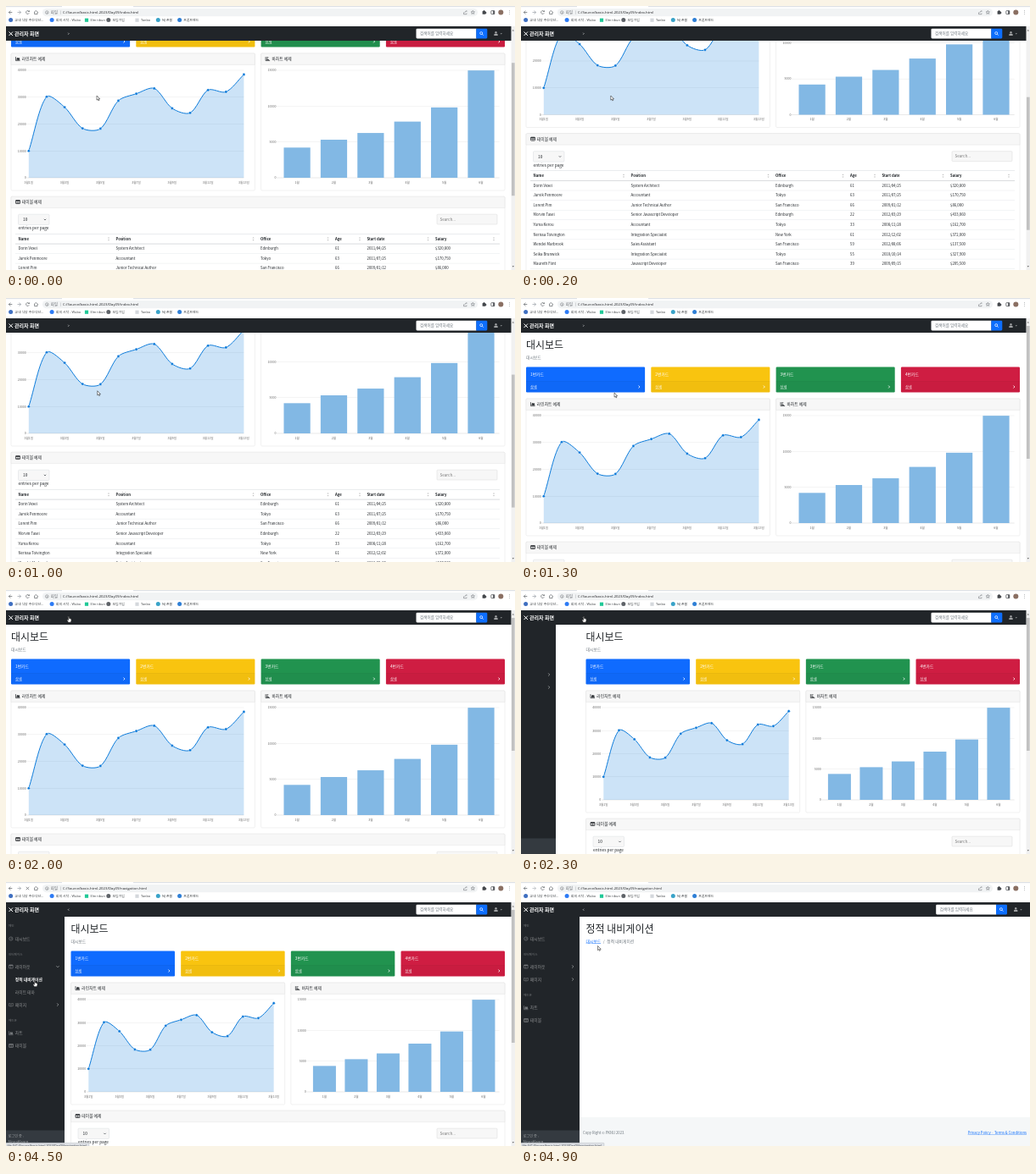
These frames come from a looping animation (600 by 312 pixels, 5 s). An HTML page with a canvas:

```html
<!DOCTYPE html>
<html lang="ko">
<head>
<meta charset="utf-8">
<title>관리자 화면</title>
<style>
html, body { margin: 0; width: 100%; height: 100%; overflow: hidden; background: #fff; }
canvas { display: block; width: 600px; height: 312px; }
</style>
</head>
<body>
<canvas id="stage"></canvas>
<script>
const LOOP = 5000, STEP = 100, W = 600, H = 312, RIGHT = 588;
const KR = '"Noto Sans CJK KR", "Noto Sans CJK", "Noto Sans", sans-serif';
const UI = '"Open Sans", "Noto Sans CJK KR", "Noto Sans CJK", sans-serif';
const INK = '#212529', LINK = '#0d6efd', DIM = '#6c757d', BLUE = '#0275d8';

const SALES = [10000, 30162, 26263, 18394, 18287, 28682, 31274, 33259, 25849, 24159, 32651, 31984, 38451];
const MONTHS = [4215, 5312, 6251, 7841, 9821, 14984];
const COLS = [14.5, 129.5, 300, 388, 425.5, 506];
const HEAD = ['Name', 'Position', 'Office', 'Age', 'Start date', 'Salary'];
const ROWS = [
  'Dorin Vexel|System Architect|Edinburgh|61|2011/04/25|$320,800',
  'Jarvik Penmoore|Accountant|Tokyo|63|2011/07/25|$170,750',
  'Lorent Pim|Junior Technical Author|San Francisco|66|2009/01/12|$86,000',
  'Morvin Tasel|Senior Javascript Developer|Edinburgh|22|2012/03/29|$433,060',
  'Yuma Kerou|Accountant|Tokyo|33|2008/11/28|$162,700',
  'Nerissa Tolvington|Integration Specialist|New York|61|2012/12/02|$372,000',
  'Wendel Marbrook|Sales Assistant|San Francisco|59|2012/08/06|$137,500',
  'Selka Brunwick|Integration Specialist|Tokyo|55|2010/10/14|$327,900',
  'Maureth Flint|Javascript Developer|San Francisco|39|2009/09/15|$205,500',
  'Tilda Brusk|Software Engineer|Edinburgh|23|2008/12/13|$103,600'
].map(r => r.split('|'));

// Keyframes: [time, value, ...]
const SCROLL = [[0, 63], [400, 212], [700, 212], [1300, 0]];
const SIDE = [[2200, -69], [2300, -28], [2400, 0]];
const POINTER = [[0, 107, 106], [500, 104, 106], [1300, 110, 112], [2000, 74, 31], [2300, 74, 31],
  [3200, 27, 97.5], [3700, 27, 97.5], [4200, 34, 116.5], [4500, 34, 116.5], [4900, 90.5, 75.5]];

const stage = document.getElementById('stage');
const c = stage.getContext('2d');
const dpr = window.devicePixelRatio || 1;
stage.width = W * dpr;
stage.height = H * dpr;

const clamp = (v, a, b) => Math.min(b, Math.max(a, v));
const ease = p => p * p * (3 - 2 * p);

function at(keys, t) {
  if (t <= keys[0][0]) return keys[0].slice(1);
  for (let i = 1; i < keys.length; i++) {
    const a = keys[i - 1], b = keys[i];
    if (t <= b[0]) {
      const p = (t - a[0]) / (b[0] - a[0]);
      return a.slice(1).map((v, k) => v + (b[k + 1] - v) * p);
    }
  }
  return keys[keys.length - 1].slice(1);
}

// y is the visual middle; glyphs are laid out large and scaled for exact advances
function text(s, x, y, size, color = INK, { align = 'left', weight = 400, font = KR } = {}) {
  c.save();
  c.translate(x, y + size * 0.36);
  c.scale(0.1, 0.1);
  c.font = `${weight} ${size * 10}px ${font}`;
  c.textAlign = align;
  c.fillStyle = color;
  c.fillText(s, 0, 0);
  const w = c.measureText(s).width / 10;
  c.restore();
  return w;
}

function underlined(s, x, y, size, color, opt = {}) {
  const w = text(s, x, y, size, color, opt);
  rect(opt.align === 'right' ? x - w : x, y + size * 0.5, w, 0.35, color);
}

function rect(x, y, w, h, color) {
  c.fillStyle = color;
  c.fillRect(x, y, w, h);
}

function box(x, y, w, h, r, fill, stroke, lw = 0.4) {
  c.beginPath();
  c.roundRect(x, y, w, h, r);
  if (fill) { c.fillStyle = fill; c.fill(); }
  if (stroke) { c.strokeStyle = stroke; c.lineWidth = lw; c.stroke(); }
}

function dot(x, y, r, fill, stroke, lw = 0.6) {
  c.beginPath();
  c.arc(x, y, r, 0, 7);
  if (fill) { c.fillStyle = fill; c.fill(); }
  if (stroke) { c.strokeStyle = stroke; c.lineWidth = lw; c.stroke(); }
}

function path(pts, color, lw, fill) {
  c.beginPath();
  pts.forEach(([x, y]) => c.lineTo(x, y));
  if (fill) { c.closePath(); c.fillStyle = fill; c.fill(); }
  if (color) { c.strokeStyle = color; c.lineWidth = lw; c.stroke(); }
}

function chevron(x, y, angle, size, color, lw = 0.8) {
  c.save();
  c.translate(x, y);
  c.rotate(angle);
  path([[-size / 2, -size], [size / 2, 0], [-size / 2, size]], color, lw);
  c.restore();
}

function icon(kind, x, y, color) {
  if (kind === 'area') {
    path([[x, y - 2.3], [x, y + 2.2], [x + 5, y + 2.2]], color, 0.7);
    path([[x + 1, y + 1.4], [x + 1, y], [x + 2.2, y - 1.7], [x + 3.2, y - 0.6], [x + 4.1, y - 1.4], [x + 4.8, y + 1.4]], null, 0, color);
  } else if (kind === 'bars') {
    path([[x, y - 2.3], [x, y + 2.2], [x + 5, y + 2.2]], color, 0.7);
    [2.2, 1.4, 3].forEach((w, i) => rect(x + 1, y - 1.9 + i * 1.3, w, 0.8, color));
  } else if (kind === 'table') {
    box(x, y - 2, 5, 4, 0.5, null, color, 0.7);
    rect(x, y - 2, 5, 1.2, color);
    rect(x + 2.3, y - 1, 0.5, 3, color);
    rect(x, y + 0.4, 5, 0.5, color);
  } else if (kind === 'gauge') {
    dot(x + 2.3, y, 2.1, null, color, 0.7);
    path([[x + 2.3, y + 0.8], [x + 3, y - 1]], color, 0.6);
  } else if (kind === 'columns') {
    box(x, y - 2, 4.6, 4, 0.5, null, color, 0.7);
    rect(x, y - 2, 4.6, 1, color);
    rect(x + 2, y - 1, 0.5, 3, color);
  } else {
    path([[x, y - 1.6], [x + 2.4, y - 1], [x + 4.8, y - 1.6], [x + 4.8, y + 1.5], [x + 2.4, y + 2], [x, y + 1.5], [x, y - 1.6]], color, 0.6);
    rect(x + 2.1, y - 1, 0.6, 3, color);
  }
}

function lens(x, y, color) {
  dot(x - 0.4, y - 0.4, 1.5, null, color, 0.7);
  path([[x + 0.7, y + 0.7], [x + 2.1, y + 2.1]], color, 0.8);
}

function panel(x, y, w, h, kind, title) {
  box(x, y, w, h, 1.2, '#fff', '#dcdcdc');
  box(x, y, w, 13.4, [1.2, 1.2, 0, 0], '#f7f7f7', '#dcdcdc');
  icon(kind, x + 5.5, y + 6.4, INK);
  text(title, x + 12.8, y + 6.4, 4.8);
}

function axis(x0, x1, top, base, max, parts) {
  for (let i = 0; i <= parts; i++) {
    const y = base - (base - top) * i / parts;
    rect(x0 - 2.4, y - 0.2, x1 - x0 + 2.4, 0.4, i ? '#e4e4e4' : '#c8c8c8');
    text(String(max * i / parts), x0 - 3, y, 3.6, '#666', { align: 'right' });
  }
}

function lineChart(x0, x1, top, base) {
  axis(x0, x1, top, base, 40000, 4);
  const last = SALES.length - 1;
  const pts = SALES.map((v, i) => [x0 + (x1 - x0) * i / last, base - (base - top) * v / 40000]);
  const ctrl = pts.map((p, i) => {
    const a = pts[i - 1] || p, b = pts[i + 1] || p;
    const da = Math.hypot(p[0] - a[0], p[1] - a[1]), db = Math.hypot(b[0] - p[0], b[1] - p[1]);
    const put = k => [p[0] + k * (b[0] - a[0]), clamp(p[1] + k * (b[1] - a[1]), top, base)];
    return [put(-0.3 * da / (da + db)), put(0.3 * db / (da + db))];
  });
  const trace = () => {
    c.beginPath();
    c.moveTo(...pts[0]);
    for (let i = 1; i <= last; i++) c.bezierCurveTo(...ctrl[i - 1][1], ...ctrl[i][0], ...pts[i]);
  };
  trace();
  c.lineTo(x1, base);
  c.lineTo(x0, base);
  c.fillStyle = 'rgba(2,117,216,.2)';
  c.fill();
  trace();
  c.strokeStyle = BLUE;
  c.lineWidth = 0.95;
  c.stroke();
  pts.forEach(([x, y], i) => {
    dot(x, y, 1.6, BLUE, 'rgba(255,255,255,.8)', 0.5);
    if (i % 2 === 0) text(`3월${i + 1}일`, x, base + 5.4, 3.6, '#666', { align: 'center' });
  });
}

function barChart(x0, x1, top, base) {
  axis(x0, x1, top, base, 15000, 3);
  const pitch = (x1 - x0) / MONTHS.length, w = pitch * 0.72;
  MONTHS.forEach((v, i) => {
    const x = x0 + pitch * (i + 0.5), h = (base - top) * v / 15000;
    rect(x - w / 2, base - h, w, h, '#82b8e4');
    text(`${i + 1}월`, x, base + 5.4, 3.6, '#666', { align: 'center' });
  });
}

function cards(left) {
  const pitch = (RIGHT - left + 7.2) / 4, w = pitch - 7.2;
  ['#0f6bff', '#f9c40f', '#21934f', '#cf1d42'].forEach((color, i) => {
    const x = left + pitch * i;
    box(x, 81.5, w, 30, 1.2, color);
    rect(x, 98.6, w, 12.9, 'rgba(0,0,0,.03)');
    rect(x, 98.4, w, 0.4, 'rgba(0,0,0,.13)');
    text(`${i + 1}번카드`, x + 5, 90, 4.8, '#fff');
    underlined('상세', x + 5, 105, 4.2, '#fff');
    chevron(x + w - 6.8, 105, 0, 1.5, '#fff');
  });
}

function table(left, y) {
  panel(left, y, RIGHT - left, 194.5, 'table', '테이블 예제');
  const x = left + 8.5;
  box(x, y + 21, 36.5, 12.3, 1.2, '#f7f7f7', '#cfd4da');
  text('10', x + 5.5, y + 27.3, 4.8);
  chevron(x + 31.5, y + 27.2, Math.PI / 2, 1.2, '#343a40', 0.7);
  text('entries per page', x, y + 37.3, 4.8);
  box(508, y + 21, 71, 11.8, 1, '#f7f7f7', '#d2d2d2');
  text('Search...', 511.5, y + 27, 4.6, '#777');
  if (left > 50) return;
  rect(11, y + 43.8, 571, 0.5, '#d5d9dd');
  rect(11, y + 55.6, 571, 0.5, '#b4b8bc');
  HEAD.forEach((s, i) => {
    text(s, COLS[i], y + 50, 4.3, INK, { weight: 700 });
    const sx = (COLS[i + 1] || 583.5) - 8.5;
    path([[sx - 1, y + 49.3], [sx, y + 47.8], [sx + 1, y + 49.3]], null, 0, '#bbb');
    path([[sx - 1, y + 50.8], [sx, y + 52.3], [sx + 1, y + 50.8]], null, 0, '#bbb');
  });
  ROWS.forEach((row, i) => {
    const ry = y + 61.5 + i * 11.58;
    row.forEach((s, k) => text(s, COLS[k], ry, 4.3));
    rect(11, ry + 5.6, 571, 0.4, '#dee2e6');
  });
  text('Showing 1 to 10 of 57 entries', 14.5, y + 181, 4.8);
  for (let i = 0; i < 7; i++) {
    const px = 504.5 + i * 10.6;
    box(px, y + 175, 10.6, 12, 0, i ? '#fff' : '#d9d9d9', '#dee2e6');
    text(i < 6 ? String(i + 1) : '›', px + 5.3, y + 181, 4.8, i ? LINK : INK, { align: 'center' });
  }
}

function footer(left, right, y) {
  rect(left, y, right - left, 34, '#f5f7f8');
  text('Copy Right © PKNU 2023.', left + (left ? 4 : 2), y + 18, 4.2, DIM);
  underlined('Privacy Policy · Terms & Conditions', right - 4, y + 18, 4.2, LINK, { align: 'right' });
}

function dashboard(left, scroll) {
  c.save();
  c.translate(0, -scroll);
  text('대시보드', left, 56, 12, INK, { weight: 500 });
  text('대시보드', left, 70, 4.8, DIM);
  cards(left);
  const pitch = (RIGHT - left + 7.2) / 2, w = pitch - 7.2;
  const base = left < 50 ? 266 : 248, low = base + 15;
  panel(left, 119, w, low - 119, 'area', '라인차트 예제');
  lineChart(left + 20.8, left + w - 13, 139, base);
  panel(left + pitch, 119, w, low - 119, 'bars', '바차트 예제');
  barChart(left + pitch + 20.8, 581.7, 139, base);
  table(left, low + 7.2);
  if (left < 50) footer(0, 595.5, 490);
  c.restore();
  rect(595.5, 24, 4.5, 288, '#f1f1f1');
  rect(596, 33 + scroll * 0.543, 3.6, 157, '#c1c1c1');
  path([[596.6, 29.5], [597.8, 27.8], [599, 29.5]], null, 0, '#777');
  path([[596.6, 307], [597.8, 308.7], [599, 307]], null, 0, '#777');
}

function subpage() {
  text('정적 내비게이션', 76.5, 56, 12, INK, { weight: 500 });
  underlined('대시보드', 76.5, 70, 4.8, LINK);
  text('/', 96.8, 70, 4.8, DIM);
  text('정적 내비게이션', 101.3, 70, 4.8, DIM);
  footer(69, W, 278);
}

function sidebar(x, open, [mx, my]) {
  c.save();
  c.translate(x, 0);
  rect(0, 41, 69, 271, '#212529');
  const shift = 30 * open;
  const hot = y => mx < 69 && x === 0 && Math.abs(my - y) < 7;
  const heading = (s, y) => text(s, 3, y, 3.6, '#74777a');
  const item = (s, y, kind, arrow) => {
    const on = hot(y);
    if (kind) icon(kind, 3.5, y, on ? '#b5b7b9' : '#74777a');
    text(s, 10.8, y, 4.8, on ? '#fff' : '#909294', { weight: on ? 700 : 400 });
    if (arrow !== undefined) chevron(61, y, arrow * Math.PI / 2, 1.6, on ? '#fff' : '#a0a2a4');
  };
  heading('메인', 52);
  item('대시보드', 67, 'gauge');
  heading('인터페이스', 86);
  item('레이아웃', 100, 'columns', open > 0 ? 1 : 0);
  if (open > 0) {
    c.save();
    c.beginPath();
    c.rect(0, 107.5, 69, shift);
    c.clip();
    item('정적 내비게이션', 115);
    item('라이트 테마', 130);
    c.restore();
  }
  item('페이지', 115 + shift, 'book', 0);
  heading('애드온', 134 + shift);
  item('차트', 148.5 + shift, 'area');
  item('테이블', 163.5 + shift, 'table');
  rect(0, 293.5, 69, 18.5, '#343a40');
  text('로그인 중 :', 2.5, 300, 4.2, '#999c9f');
  text('NovaKwen', 2.5, 307, 4.8, '#999c9f');
  c.restore();
}

function navbar(opened, right, dx) {
  rect(0, 24, right, 17, '#212529');
  path([[3.5, 30.5], [8, 35]], '#fff', 1);
  path([[8, 30.5], [3.5, 35]], '#fff', 1);
  text('관리자 화면', 10, 32.7, 6, '#fff', { weight: 700 });
  chevron(73.7, 32.7, opened ? Math.PI : 0, 1, '#c3c5c7', 0.8);
  box(483.5 + dx, 26.8, 71, 11.6, [1.3, 0, 0, 1.3], '#fff');
  text('검색어를 입력하세요', 488 + dx, 32.7, 4.6, '#6c757d');
  box(554.3 + dx, 26.8, 13, 11.6, [0, 1.3, 1.3, 0], '#0d6efd');
  lens(560.6 + dx, 32.5, '#fff');
  dot(577.5 + dx, 31.3, 1.2, '#a0a2a4');
  box(575.3 + dx, 32.8, 4.4, 2.2, [1.2, 1.2, 0, 0], '#a0a2a4');
  path([[582.6 + dx, 32.2], [585 + dx, 32.2], [583.8 + dx, 33.6]], null, 0, '#a0a2a4');
}

function browser(page, loading) {
  const gray = '#5f6368';
  rect(0, 0, W, 24, '#fff');
  rect(0, 0, 66, 1.2, '#dee1e6');
  rect(150, 0, 450, 1.2, '#dee1e6');
  const arrow = (x, d, color) => {
    path([[x - 2 * d, 7.5], [x + 2 * d, 7.5]], color, 0.7);
    path([[x, 5.5], [x + 2 * d, 7.5], [x, 9.5]], color, 0.7);
  };
  arrow(5.3, -1, gray);
  arrow(15.5, 1, loading || page === 'index' ? '#9aa0a6' : '#b4b8bc');
  if (loading) {
    path([[23.8, 5.8], [27.2, 9.2]], gray, 0.7);
    path([[27.2, 5.8], [23.8, 9.2]], gray, 0.7);
  } else {
    c.beginPath();
    c.arc(25.5, 7.5, 1.9, 0.4, 5.6);
    c.strokeStyle = gray;
    c.lineWidth = 0.7;
    c.stroke();
    path([[27.7, 5], [27.7, 7], [25.8, 7]], null, 0, gray);
  }
  path([[33, 7.6], [35.3, 5.4], [37.6, 7.6], [37, 7.6], [37, 9.6], [33.6, 9.6], [33.6, 7.6], [33, 7.6]], gray, 0.7);
  box(43, 3, 513, 9.2, 4.6, '#f1f3f4');
  dot(48.3, 7.6, 1.8, null, gray, 0.5);
  rect(48.1, 7.2, 0.5, 1.5, gray);
  text('파일', 53, 7.6, 4.3, gray, { font: UI });
  rect(64.2, 5.4, 0.4, 4.4, '#a5a9ad');
  text(`C:/Source/basic-html-2023/Day09/${page}.html`, 67, 7.6, 4.27, '#202124', { font: UI });
  path([[539.5, 7.5], [539.5, 9.7], [543, 9.7], [543, 8.5]], gray, 0.5);
  path([[540.6, 8.2], [541.4, 6.6], [543.4, 6.2], [542.5, 5.2]], gray, 0.5);
  path(Array.from({ length: 11 }, (_, i) => {
    const a = i * Math.PI / 5 - Math.PI / 2, r = i % 2 ? 1 : 2.3;
    return [550.3 + r * Math.cos(a), 7.6 + r * Math.sin(a)];
  }), gray, 0.5);
  box(561.6, 6, 3.8, 3.8, 0.5, '#45484c');
  dot(563.5, 5.8, 0.9, '#45484c');
  dot(565.5, 8, 0.9, '#45484c');
  box(571.8, 5.6, 4, 4, 0.5, null, '#45484c', 0.7);
  rect(574.2, 5.6, 1.6, 4, '#45484c');
  dot(583.3, 7.6, 3, '#8a6f62');
  [5.8, 7.6, 9.4].forEach(y => dot(593.5, y, 0.45, gray));

  const mark = (s, x, color, round) => {
    if (round) dot(x - 4.7, 16.6, 2.5, color);
    else rect(x - 6.6, 14.6, 4.2, 4.2, color);
    text(s, x, 16.7, 3.9, '#3c4043', { font: UI });
  };
  mark('교내 식당 주간식단...', 10.3, '#3f6fc0', true);
  mark('회의 시작 - Wubo', 58.8, '#2d7bf5', true);
  mark('Elm tibun', 99.5, '#20c997');
  mark('모임가입', 125.5, '#5f6368', true);
  mark('Tanbo', 159, '#d4d8dc');
  mark('NJ 존붐', 184, '#3aa3c8', true);
  mark('프론트엔드', 209.3, '#2f7fd6', true);
}

function status(page) {
  const w = page === 'index' ? 91 : 98;
  box(-1, 308.3, w + 1, 6, [0, 1, 0, 0], '#dee1e6', '#b9bcc0');
  text(`file:///C:/Source/basic-html-2023/Day09/${page}.html${page === 'index' ? '#' : ''}`, 1.5, 311.3, 3.6, '#3c4043', { font: UI });
}

function pointer(x, y, hand) {
  c.save();
  c.translate(x, y);
  c.lineJoin = 'round';
  if (hand) {
    path([[-0.6, 0.2], [0.5, 0.2], [0.5, 2.6], [2.9, 3.1], [3.1, 5], [2.4, 7.2], [-0.7, 7.2], [-2.2, 4.5], [-1.6, 4], [-0.6, 4.8], [-0.6, 0.2]], '#111', 0.6, '#fff');
  } else {
    path([[0, 0], [0, 5.2], [1.2, 4.1], [2, 5.9], [2.9, 5.5], [2.1, 3.8], [3.7, 3.8], [0, 0]], '#222', 0.55, '#fff');
  }
  c.restore();
}

function draw(t) {
  const opened = t >= 2300, moved = t >= 4600;
  const mouse = at(POINTER, t), side = at(SIDE, t)[0];
  const unfold = moved ? 0 : ease(clamp((t - 3650) / 350, 0, 1));
  c.setTransform(dpr, 0, 0, dpr, 0, 0);
  rect(0, 0, W, H, '#fff');
  if (moved) subpage();
  else dashboard(opened ? 76.5 : 6, at(SCROLL, t)[0]);
  if (opened) sidebar(side, unfold, mouse);
  navbar(opened, moved ? W : 595.5, moved ? 5.7 : 0);
  browser(t >= 4500 ? 'navigation' : 'index', t >= 4500 && !moved);
  if (t >= 2800) status(t >= 4100 ? 'navigation' : 'index');
  const overMenu = opened && mouse[0] < 69 && mouse[1] > 58;
  pointer(...mouse, overMenu || mouse[1] < 40);
}

const start = performance.now();
function tick() {
  const t = (performance.now() - start) % LOOP;
  draw(Math.floor(t / STEP) * STEP);
  requestAnimationFrame(tick);
}
tick();
</script>
</body>
</html>
```
